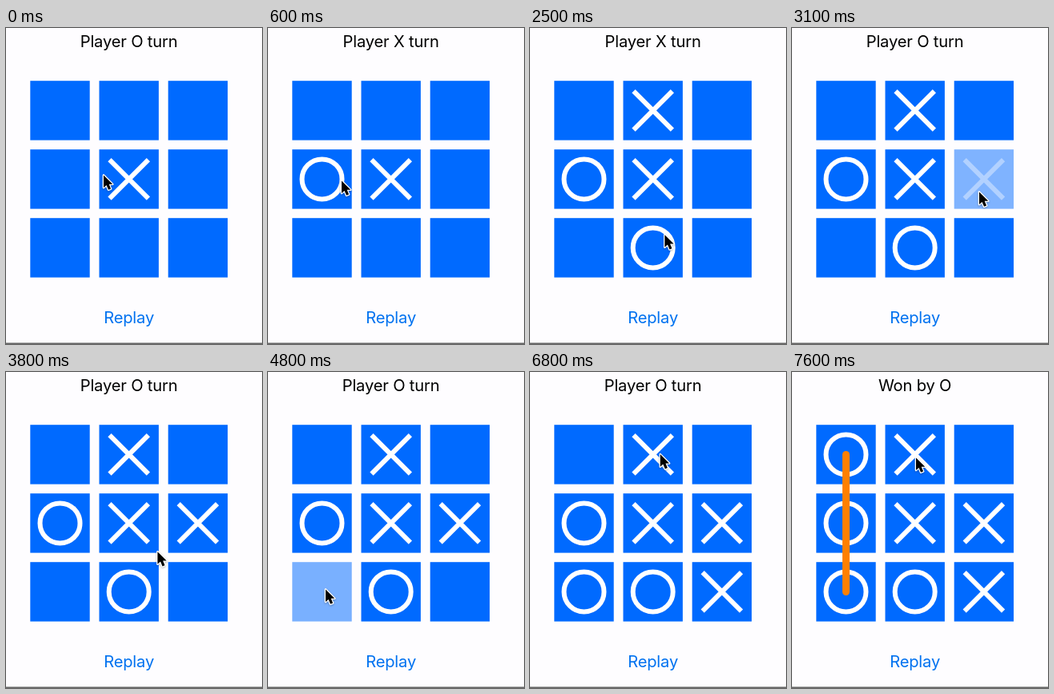
An HTML page that plays this animation: 320 by 396 pixels, repeating every 8000 ms.

```html
<!DOCTYPE html>
<html lang="en">
<head>
<meta charset="utf-8">
<title>Tic-tac-toe</title>
<style>
  html, body { margin: 0; width: 100%; height: 100%; overflow: hidden; background: #fefdff; }
  svg { display: block; width: 320px; height: 396px; }
  text { font: 20.2px Inter, "Liberation Sans", sans-serif; text-anchor: middle; letter-spacing: -.2px; }
  .mark { fill: none; stroke: #fff; stroke-width: 6; }
  #win { stroke: #ff8000; stroke-width: 9; stroke-linecap: round; }
  #cursor { stroke: #fff; stroke-width: 2.6; stroke-linejoin: round; paint-order: stroke;
            filter: drop-shadow(0 1px 1px #0004); }
</style>
</head>
<body>
<svg viewBox="0 0 320 396">
  <text id="title" x="153.6" y="24"></text>
  <g id="board"></g>
  <path id="win" d="M67.5 103.5V275.5"/>
  <text x="153.6" y="370" fill="#0072f0">Replay</text>
  <path d="M0 394.4H320V396H0Z" fill="#666"/>
  <path id="cursor" d="M0 1.5v15.6l3.6-3.2 2.5 5.9 3-1.3-2.4-5.7h4.6z"/>
</svg>
<script>
const LOOP = 8000, STEP = 100, TRAVEL = 450, PRESS = 100, FADE = 250;
const PITCH = 86.2, SIZE = 74.4;
const $ = id => document.getElementById(id);
const clamp = v => Math.max(0, Math.min(1, v));
const smooth = v => v * v * (3 - 2 * v);

// Pointer stops: arrival time, x, y and the symbol played there, if any
const stops = [
  [-600, 122, 183, 'X'],
  [250, 92, 190, 'O'],
  [1150, 152, 108, 'X'],
  [1980, 168, 258, 'O'],
  [2930, 234, 204, 'X'],
  [4090, 80, 272],
  [4740, 72, 271, 'O'],
  [5540, 219, 270, 'X'],
  [6500, 222, 97],
  [7050, 80, 108, 'O'],
  [7600, 155, 106]
].map(([at, x, y, symbol]) => ({ at, x, y, symbol }));

const shapes = {
  X: 'M-24.2-24.2 24.2 24.2M24.2-24.2-24.2 24.2',
  O: 'M-25 0a25 25 0 1 1 50 0a25 25 0 1 1-50 0'
};

function make(tag, attrs, parent) {
  const el = document.createElementNS('http://www.w3.org/2000/svg', tag);
  for (const k in attrs) el.setAttribute(k, attrs[k]);
  return parent.appendChild(el);
}

const cells = Array.from({ length: 9 }, (_, i) => {
  const x = 67.5 + i % 3 * PITCH, y = 103.4 + Math.floor(i / 3) * 86;
  const g = make('g', { transform: `translate(${x} ${y})` }, $('board'));
  make('rect', { x: -SIZE / 2, y: -SIZE / 2, width: SIZE, height: SIZE, fill: '#006aff' }, g);
  return g;
});

// Each play lands in the cell under the pointer
const plays = stops.filter(s => s.symbol);
for (const p of plays) {
  const col = Math.floor((p.x - 25) / PITCH), row = Math.floor((p.y - 60) / PITCH);
  p.release = p.at + PRESS;
  p.cell = cells[row * 3 + col];
  p.mark = make('path', { class: 'mark', d: shapes[p.symbol] }, p.cell);
}
const last = plays[plays.length - 1];

function pointer(t) {
  const i = stops.findIndex(s => s.at > t);
  if (i < 0) return stops[stops.length - 1];
  const from = stops[i - 1], to = stops[i];
  const leave = Math.max(0, to.at - TRAVEL);
  const k = smooth(clamp((t - leave) / (to.at - leave)));
  return { x: from.x + (to.x - from.x) * k, y: from.y + (to.y - from.y) * k };
}

function draw(t) {
  for (const p of plays) {
    const dt = t - p.release;
    const shade = dt < 0
      ? 1 - .8 * clamp(dt / PRESS + 1)
      : .2 + .8 * smooth(clamp((dt + 50) / (FADE + 40)));
    p.cell.setAttribute('opacity', shade);
    p.mark.setAttribute('opacity', dt < 0 ? 0 : clamp(.05 + dt / 200));
  }
  const won = t >= last.release;
  const recent = plays.filter(p => p.release <= t).pop().symbol;
  $('title').textContent = won ? `Won by ${recent}` : `Player ${recent === 'X' ? 'O' : 'X'} turn`;
  $('win').style.visibility = won ? 'visible' : 'hidden';
  const { x, y } = pointer(t);
  $('cursor').setAttribute('transform', `translate(${x} ${y})`);
}

const start = performance.now();
function tick() {
  const t = (performance.now() - start) % LOOP;
  draw(Math.floor(t / STEP) * STEP);
  requestAnimationFrame(tick);
}
tick();
</script>
</body>
</html>
```
